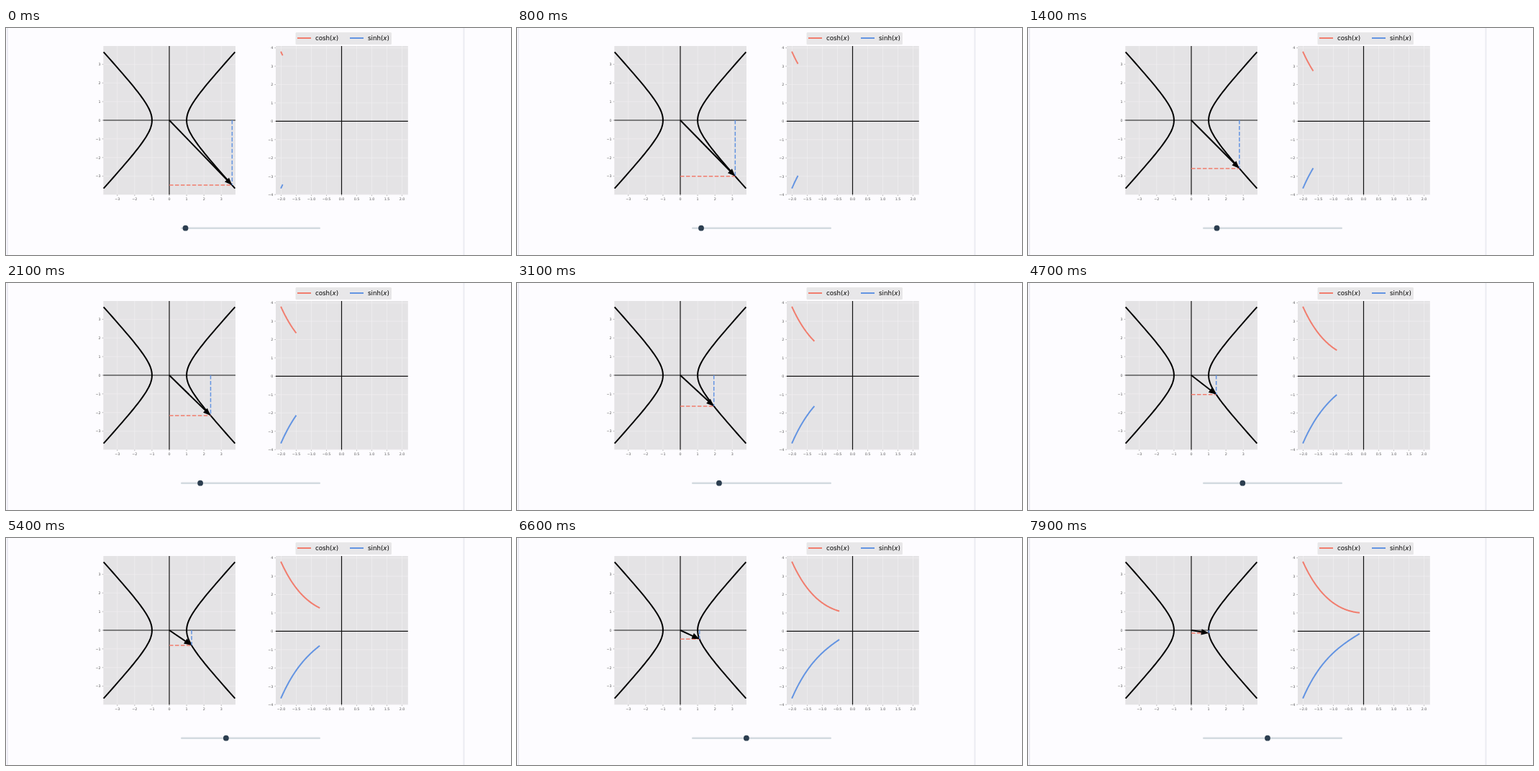
Write an HTML page that moves like this. It is 702x315 px and loops after 8 s.

```html
<!DOCTYPE html>
<html lang="en">
<head>
<meta charset="utf-8">
<title>Hyperbolic functions</title>
<style>
  html, body { margin: 0; width: 100%; height: 100%; overflow: hidden; background: #fdfcff; }
  svg { display: block; }
  path { fill: none; }
  text { font-family: "DejaVu Sans", sans-serif; }
  .tick { font-size: 4.8px; fill: #555; }
  .legend { font-size: 8.7px; fill: #000; }
  .grid { stroke: #f1f0f2; stroke-width: .6; }
  .mark { stroke: #777; stroke-width: .5; }
  .axis { stroke: #111; stroke-width: 1.2; }
  .black { stroke: #000; stroke-width: 2; stroke-linecap: square; }
  .cosh { stroke: #f17d6e; stroke-width: 2; }
  .sinh { stroke: #6394e2; stroke-width: 2; }
  .curve { stroke-linecap: square; stroke-linejoin: round; }
  .dash { stroke-width: 1.5; stroke-dasharray: 5.55 2.4; }
</style>
</head>
<body>
<svg id="stage" width="702" height="315" viewBox="0 0 702 315">
  <rect x="1" width="2" height="315" fill="#ebebf2"/>
  <rect x="635.5" width="2" height="315" fill="#ebebf2"/>
  <text x="42" y="-1" font-size="9" fill="#888">(a)</text>
  <g id="plots"></g>

  <rect x="402.5" y="6" width="133.5" height="17" rx="1.5" fill="#e8e7e9"/>
  <path class="cosh" d="M405 14H424"/>
  <path class="sinh" d="M478 14H497"/>
  <text class="legend" x="430" y="17">cosh(<tspan font-style="italic">x</tspan>)</text>
  <text class="legend" x="503" y="17">sinh(<tspan font-style="italic">x</tspan>)</text>

  <path id="hyperbola" class="black"/>
  <path id="coshDash" class="cosh dash"/>
  <path id="sinhDash" class="sinh dash"/>
  <path id="shaft" class="black" style="stroke-linecap:butt"/>
  <path id="head" style="fill:#000"/>
  <path id="coshCurve" class="cosh curve"/>
  <path id="sinhCurve" class="sinh curve"/>

  <rect x="243" y="276.5" width="194" height="2.4" rx="1.2" fill="#d3dae0"/>
  <circle id="thumb" cy="277.7" r="3.9" fill="#2c3e50"/>
</svg>
<script>
const LOOP = 8000, STEP = 100, START = -2;
const TOP = 25, BOTTOM = 231.3;
const { cosh, sinh, hypot } = Math;
const $ = id => document.getElementById(id);

const left = { x0: 227, y0: 128, sx: 24.1, sy: 25.87, from: 135.3, to: 319 };
const right = { x0: 466.5, y0: 129.4, sx: 42, sy: 25.45, from: 375, to: 558.8 };

const px = (p, x) => p.x0 + p.sx * x;
const py = (p, y) => p.y0 - p.sy * y;
const label = (v, digits) => v.toFixed(digits).replace('-', '−');

function range(from, to, step) {
  const values = [];
  for (let v = from; v <= to; v += step) values.push(v);
  return values;
}

function plotMarkup(p, xs, ys, digits) {
  let s = `<rect x="${p.from}" y="${TOP}" width="${p.to - p.from}" height="${BOTTOM - TOP}" fill="#e4e3e5"/>`;
  for (const v of xs) {
    const x = px(p, v);
    s += `<path class="grid" d="M${x} ${TOP}V${BOTTOM}"/><path class="mark" d="M${x} ${BOTTOM}v1.7"/>
      <text class="tick" x="${x}" y="238.6" text-anchor="middle">${label(v, digits)}</text>`;
  }
  for (const v of ys) {
    const y = py(p, v);
    s += `<path class="grid" d="M${p.from} ${y}H${p.to}"/><path class="mark" d="M${p.from} ${y}h-1.7"/>
      <text class="tick" x="${p.from - 3.7}" y="${y + 1.8}" text-anchor="end">${label(v, 0)}</text>`;
  }
  return s + `<path class="axis" d="M${p.from} ${p.y0}H${p.to}M${p.x0} ${TOP}V${BOTTOM}"/>`;
}

// Samples the parametric curve (fx(t), fy(t)) from START to end.
function trace(p, fx, fy, end) {
  const n = 80, points = [];
  for (let i = 0; i <= n; i++) {
    const t = START + (end - START) * i / n;
    points.push(px(p, fx(t)).toFixed(2) + ' ' + py(p, fy(t)).toFixed(2));
  }
  return 'M' + points.join('L');
}

function draw(time) {
  const n = Math.floor(time % LOOP / STEP);
  // The slider starts a little slower, then moves evenly.
  const u = n < 8 ? -1.961 + .0176 * n : -1.82 + .02346 * (n - 8);
  const { x0, y0 } = left;
  const x = px(left, cosh(u)), y = py(left, sinh(u));

  $('coshDash').setAttribute('d', `M${x0} ${y}H${x}`);
  $('sinhDash').setAttribute('d', `M${x} ${y0}V${y}`);

  const len = hypot(x - x0, y - y0);
  const dx = (x - x0) / len, dy = (y - y0) / len;
  const bx = x - 10.5 * dx, by = y - 10.5 * dy, half = 4.2;
  $('shaft').setAttribute('d', `M${x0} ${y0}L${bx + dx} ${by + dy}`);
  $('head').setAttribute('d',
    `M${x} ${y}L${bx - half * dy} ${by + half * dx}L${bx + half * dy} ${by - half * dx}Z`);

  $('coshCurve').setAttribute('d', trace(right, t => t, cosh, u));
  $('sinhCurve').setAttribute('d', trace(right, t => t, sinh, u));
  $('thumb').setAttribute('cx', 340.1 + 46.2 * u);
}

$('plots').innerHTML =
  plotMarkup(left, range(-3, 3, 1), range(-3, 3, 1), 0) +
  plotMarkup(right, range(-2, 2, .5), range(-4, 4, 1), 1);
$('hyperbola').setAttribute('d',
  trace(left, cosh, sinh, 2) + trace(left, t => -cosh(t), sinh, 2));

const begin = performance.now();
function frame() {
  draw(performance.now() - begin);
  requestAnimationFrame(frame);
}
frame();
</script>
</body>
</html>
```
